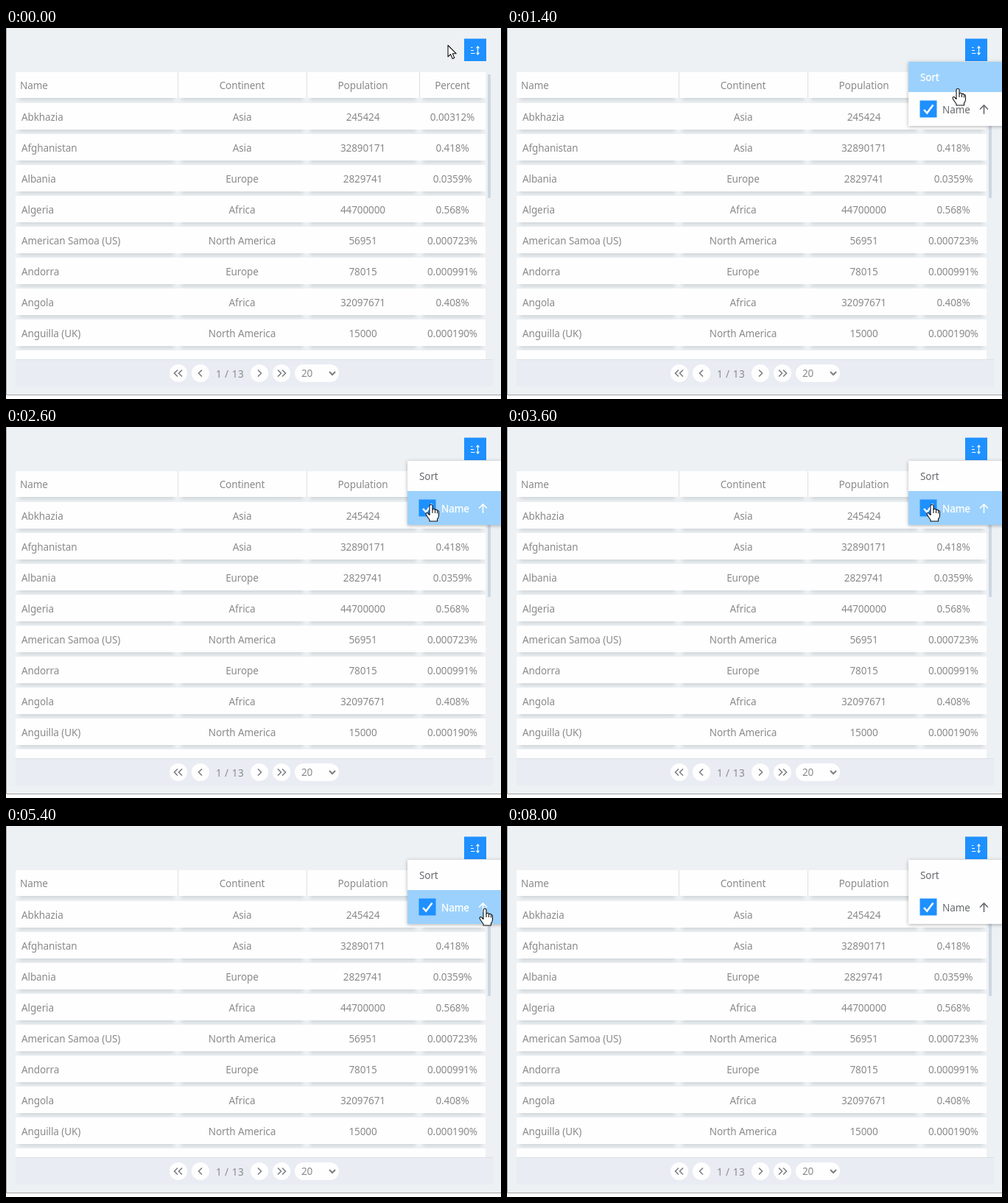
Recreate the animation shown at these times as an HTML page. Size 672 by 504 pixels, loop 8.6 s.

```html
<!DOCTYPE html>
<html lang="en">
<head>
<meta charset="utf-8">
<title>Sortable table</title>
<style>
html, body { margin: 0; width: 100%; height: 100%; overflow: hidden; background: #fff; }
svg { display: block; width: 672px; height: 504px; }
text { font: 13.5px "Noto Sans", "Open Sans", sans-serif; letter-spacing: -.1px; fill: #8a8a8b; }
.mid { text-anchor: middle; }
.white { fill: #fefefe; }
.shade { fill: rgba(40, 50, 50, .14); filter: blur(2.5px); }
.icon { fill: none; stroke: #7d7f84; stroke-width: 1.6; }
.item rect.bg { fill: #fefefe; }
.item text { fill: #686a6e; }
.item .arrow { fill: none; stroke: #686a6e; stroke-width: 1.6; }
.item.hover rect.bg { fill: #9bd1fc; }
.item.hover text { fill: #fff; stroke: #fff; stroke-width: .3px; }
.item.hover .arrow { stroke: #fff; }
.panel { fill: #fefefe; filter: drop-shadow(0 1px 2.5px rgba(0, 0, 0, .3)); }
#pointer path { fill: #fff; stroke: #111; stroke-width: 1.1; stroke-linejoin: round; }
</style>
</head>
<body>
<svg viewBox="0 0 672 504">
  <defs>
    <clipPath id="view"><rect y="96" width="672" height="354"/></clipPath>
    <path id="chevron" d="M2 -4.500L-2.500 0 2 4.500"/>
  </defs>
  <rect width="672" height="498" fill="#edf1f4"/>
  <path d="M.5 0V498.500H672" fill="none" stroke="#a3a5a8"/>

  <g id="rows" clip-path="url(#view)"></g>
  <g id="head"></g>
  <rect x="654" y="63" width="4" height="168" rx="1" fill="#ced6e3"/>

  <rect x="13" y="450" width="648" height="37" fill="#e9ecf3"/>
  <path d="M13 450.500H661" stroke="#dde0e5"/>
  <g id="pager"></g>
  <rect class="white" x="392" y="457" width="60" height="24" rx="12"/>
  <path class="icon" d="M439 467l4 4 4-4" style="stroke-width:2"/>
  <text class="mid" x="304" y="475" style="letter-spacing:.5px">1 / 13</text>
  <text x="401" y="474">20</text>

  <rect x="622" y="14.500" width="30" height="30.500" fill="#1e90ff"/>
  <path d="M631 26.500h2.500M631 30.500h4M631 34.500h5.500M640.500 26v9M638.500 27.500l2-2.500 2 2.500M638.500 33.500l2 2.500 2-2.500" fill="none" stroke="#fff" stroke-width="1.200"/>

  <g id="menu">
    <rect class="panel" x="545" y="46" width="140" height="87"/>
    <g class="item" id="sort">
      <rect class="bg" x="545" y="46" width="127" height="41"/>
      <text x="561" y="72">Sort</text>
    </g>
    <g class="item" id="name">
      <rect class="bg" x="545" y="87" width="127" height="46"/>
      <rect x="560.500" y="98.500" width="23" height="23" fill="#1e90ff"/>
      <path d="M566 111l4.200 4.500 8.300-11" fill="none" stroke="#fff" stroke-width="2.500"/>
      <text x="591" y="116">Name</text>
      <path class="arrow" d="M647.500 117V105M642 110.500l5.500-5.500 5.500 5.500"/>
    </g>
  </g>

  <g id="pointer">
    <path id="arrow" d="M0 .5V16l3.600-3.300 2.600 6 2.600-1.100-2.500-5.800h5z"/>
    <g id="hand">
      <path d="M-2 12V2Q-2 .5 0 .5T2 2V7.500Q2.500 6 4 6.300T5.500 8Q6 7 7.300 7.400T8.500 9Q10.500 8 10.500 11V15Q10.500 18 8.500 20V23H-2V21Q-4 18.500-6.500 14.500C-8 12-5.500 10.500-4 12.500L-2 14.500Z"/>
      <path d="M2 7.500V12M5.500 8V12M8.500 9.500V12.500" fill="none"/>
    </g>
  </g>
</svg>
<script>
const $ = id => document.getElementById(id);
const make = (parent, tag, attrs, label = "") => {
  const node = document.createElementNS("http://www.w3.org/2000/svg", tag);
  for (const key in attrs) node.setAttribute(key, attrs[key]);
  node.textContent = label;
  parent.append(node);
};

// Table: column edges, then one white strip per row with a soft shadow under each cell
const edges = [13, 233, 408, 561, 651];
function addRow(parent, cells, y, height, pad) {
  edges.slice(1).forEach((right, i) =>
    make(parent, "rect", { class: "shade", x: edges[i] + 5, y: y + 14, width: right - edges[i] - 10, height: height - 11 }));
  make(parent, "rect", { class: "white", x: 13, y, width: 638, height });
  cells.forEach((cell, i) => {
    const middle = (edges[i] + edges[i + 1]) / 2;
    const place = i ? { x: middle, class: "mid" } : { x: 13 + pad };
    make(parent, "text", { ...place, y: y + height / 2 + 5.5 }, cell);
  });
}

const data = `Abkhazia|Asia|245424|0.00312%
Afghanistan|Asia|32890171|0.418%
Albania|Europe|2829741|0.0359%
Algeria|Africa|44700000|0.568%
American Samoa (US)|North America|56951|0.000723%
Andorra|Europe|78015|0.000991%
Angola|Africa|32097671|0.408%
Anguilla (UK)|North America|15000|0.000190%
`;
data.split("\n").forEach((line, i) => addRow($("rows"), line.split("|"), 102 + 42 * i, 36, 8));
addRow($("head"), ["Name", "Continent", "Population", "Percent"], 60, 35, 6);
for (const x of edges.slice(1, -1))
  make($("head"), "path", { d: `M${x + .5} 60v35`, stroke: "#dcdfe2" });

// Pager: outer buttons carry two chevrons, the right pair is mirrored
for (const side of [-1, 1]) for (const count of [1, 2]) {
  const x = 304 + side * (10 + 30 * count);
  make($("pager"), "circle", { class: "white", cx: x, cy: 469, r: 12 });
  for (let k = 0; k < count; k++)
    make($("pager"), "use", {
      href: "#chevron", class: "icon",
      transform: `translate(${x + 6 * k - 3 * (count - 1)} 469) scale(${-side} 1)`
    });
}

// Pointer key points; it eases from each to the next
const keys = [
  { t: 0, x: 600, y: 23 },
  { t: 600, x: 634, y: 27 },
  { t: 1000, x: 634, y: 27 },
  { t: 1400, x: 612, y: 82 },
  { t: 2200, x: 577, y: 105 },
  { t: 3600, x: 577, y: 105 },
  { t: 5000, x: 650, y: 112 },
  { t: 6800, x: 650, y: 112 },
  { t: 7800, x: 126, y: 496 }
];
const LOOP = 8600, STEP = 200, OPEN = 1000, GONE = 8000;
const ease = p => p * p * (3 - 2 * p);

function pointerAt(t) {
  const next = keys.findIndex(key => key.t > t);
  if (next < 0) return keys.at(-1);
  const a = keys[next - 1], b = keys[next];
  const p = ease((t - a.t) / (b.t - a.t));
  return { x: Math.round(a.x + (b.x - a.x) * p), y: Math.round(a.y + (b.y - a.y) * p) };
}

const show = (id, on) => $(id).style.display = on ? "" : "none";
const start = performance.now();

function draw(now) {
  const time = Math.max(0, now - start) % LOOP;
  const t = Math.floor(time / STEP) * STEP;
  const { x, y } = pointerAt(t);
  const open = t >= OPEN;
  const onSort = open && x >= 545 && y >= 46 && y < 87;
  const onName = open && x >= 545 && y >= 87 && y < 133;
  const onButton = x >= 622 && x < 652 && y >= 15 && y < 45;
  const hand = onSort || onName || onButton;
  show("menu", open);
  show("pointer", t < GONE);
  show("hand", hand);
  show("arrow", !hand);
  $("sort").classList.toggle("hover", onSort);
  $("name").classList.toggle("hover", onName);
  $("pointer").setAttribute("transform", `translate(${x} ${y})`);
  requestAnimationFrame(draw);
}
draw(start);
</script>
</body>
</html>
```
